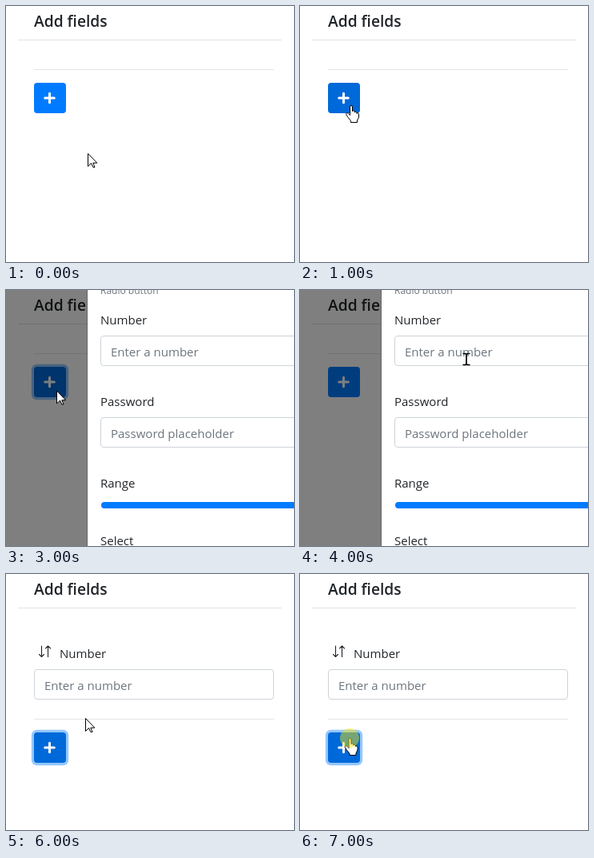
Animation of 360 by 320 pixels, one loop 8000 ms. Source, as an HTML page:

```html
<!DOCTYPE html>
<html lang="en">
<head>
<meta charset="utf-8">
<title>Add fields</title>
<style>
html, body { margin: 0; width: 100%; height: 100%; overflow: hidden; background: #fff; }
svg { display: block; width: 360px; height: 320px; }
text { font: 15px "Open Sans", "Noto Sans", sans-serif; fill: #212529; }
.title { font-size: 19.2px; font-weight: 600; }
.hint { fill: #6c757d; }
.small { font-size: 12px; fill: #6c757d; }
.box { fill: #fff; stroke: #ced4da; }
.line { fill: #e5e5e5; }
.pointer { fill: #fff; stroke: #000; stroke-linejoin: round; }
</style>
</head>
<body>
<svg id="stage" viewBox="0 0 360 320">
  <defs>
    <path id="arrow" class="pointer" d="M.5 .5V16.5L4.5 12.5L6.8 17.5H9L6.8 12.2H11.8Z"/>
    <path id="hand" class="pointer" d="M5.5 12.5V2A1.5 1.5 0 0 1 8.5 2V7.5C8.5 6.5 11.3 6.6 11.3 8V9C11.3 8 13.9 8.1 13.9 9.4V10.4C13.9 9.5 16.5 9.6 16.5 11.2V15L14.5 19V21.5H6.5V19.5L2.5 14.5L.7 11.5C.2 9.8 2.2 9 3.4 10.4Z"/>
    <path id="beam" d="M0 .5H3.2L4.5 1.5L5.8 .5H9M4.5 1.5V13.5M0 14.5H3.2L4.5 13.5L5.8 14.5H9" fill="none" stroke="#000" stroke-width="1.7"/>
  </defs>
  <rect width="360" height="320" fill="#fff"/>
  <text class="title" x="35" y="26">Add fields</text>
  <rect x="15" y="42" width="330" height="1" fill="#dee2e6"/>
  <g id="field">
    <path d="M44.5 90V103.5M41.5 100.5L44.5 103.5L47.5 100.5M52.5 103.5V90M49.5 93L52.5 90L55.5 93" fill="none" stroke="#212529" stroke-width="1.1" stroke-linecap="round" stroke-linejoin="round"/>
    <text x="67" y="105">Number</text>
    <rect class="box" x="35.5" y="119.5" width="299" height="37" rx="3.5"/>
    <text class="hint" x="48" y="145">Enter a number</text>
  </g>
  <g id="add">
    <rect class="line" x="35" y="79" width="300" height="1"/>
    <rect id="ring" x="31.8" y="92.8" width="46.4" height="44.4" rx="7" fill="#92c7ff"/>
    <rect id="button" x="35" y="96" width="40" height="38" rx="4"/>
    <path d="M48.7 115H60.3M54.5 109.2V120.8" stroke="#fff" stroke-width="3" stroke-linecap="round"/>
  </g>
  <g id="modal">
    <rect width="360" height="320" fill="#000" opacity=".5"/>
    <rect x="101" width="1" height="320" fill="#666"/>
    <rect x="102" width="258" height="320" fill="#fff"/>
    <text class="small" x="118" y="5">Radio button</text>
    <text x="118" y="43">Number</text>
    <rect class="box" x="118.5" y="57.5" width="260" height="37" rx="3.5"/>
    <text class="hint" x="131" y="83">Enter a number</text>
    <rect id="caret" x="131" y="66" width="1" height="21" fill="#212529"/>
    <text x="118" y="145">Password</text>
    <rect class="box" x="118.5" y="159.5" width="260" height="37" rx="3.5"/>
    <text class="hint" x="131" y="185">Password placeholder</text>
    <text x="118" y="247">Range</text>
    <rect x="119" y="265" width="260" height="8" rx="4" fill="#007bff"/>
    <text x="118" y="319">Select</text>
  </g>
  <use id="cursor"/>
  <circle id="spot" r="12" fill="#ebe114"/>
</svg>
<script>
const $ = id => document.getElementById(id);
const [field, add, ring, button, modal, caret, spot, cursor] =
  ["field", "add", "ring", "button", "modal", "caret", "spot", "cursor"].map($);

const STEP = 1000;
// spot: x, y, opacity of the click highlight
const steps = [
  { cursor: ["arrow", 102, 184] },
  { cursor: ["hand", 57, 124], hover: true },
  { cursor: ["hand", 57, 124], hover: true, spot: [63, 124, .5] },
  { cursor: ["arrow", 63, 125.5], hover: true, focus: true, modal: true },
  { cursor: ["beam", 203.5, 79], modal: true },
  { cursor: ["beam", 203.5, 79], modal: true, caret: true, spot: [207.5, 86, .72] },
  { cursor: ["arrow", 99, 180], hover: true, focus: true, field: true },
  { cursor: ["hand", 55.5, 205], hover: true, focus: true, field: true, spot: [62, 205, .5] }
];

const show = (el, on) => el.setAttribute("visibility", on ? "inherit" : "hidden");
const moveTo = (el, x, y) => el.setAttribute("transform", `translate(${x} ${y})`);

function render(s) {
  show(field, s.field);
  show(ring, s.focus);
  show(modal, s.modal);
  show(caret, s.caret);
  show(spot, s.spot);
  moveTo(add, 0, s.field ? 102 : 0);
  button.setAttribute("fill", s.hover ? "#0069d9" : "#007bff");

  const [shape, x, y] = s.cursor;
  cursor.setAttribute("href", "#" + shape);
  moveTo(cursor, x, y);
  if (s.spot) {
    const [sx, sy, opacity] = s.spot;
    moveTo(spot, sx, sy);
    spot.setAttribute("opacity", opacity);
  }
}

let current = -1;
function tick() {
  const i = Math.floor(performance.now() / STEP) % steps.length;
  if (i !== current) render(steps[current = i]);
  requestAnimationFrame(tick);
}
tick();
</script>
</body>
</html>
```
